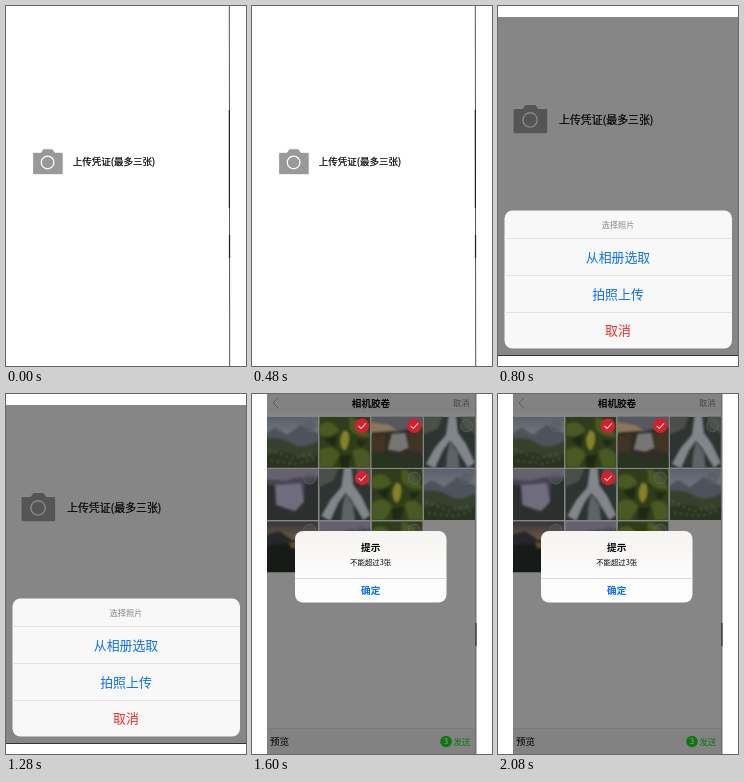
Recreate the animation shown at these times as an HTML page. Size 240 by 360 pixels, loop 2.4 s.

```html
<!DOCTYPE html>
<html lang="zh-CN">
<head>
<meta charset="utf-8">
<style>
  html, body { margin: 0; width: 100%; height: 100%; overflow: hidden; background: #fff; }
  svg { display: block; width: 240px; height: 360px; }
  text { font-family: "Noto Sans CJK SC", "Noto Sans CJK", sans-serif; }
  .mid { text-anchor: middle; }
  .bold { font-weight: 700; }
  .label { stroke: #000; stroke-width: .2; }
  .soft { filter: blur(.8px); }
</style>
</head>
<body>
<svg viewBox="0 0 240 360">
  <defs>
    <g id="camera">
      <path d="M1.5 3.5H8L10 .5Q10.4 0 11 0H19Q19.6 0 20 .5L22 3.5H28.5Q30 3.5 30 5V24Q30 25.5 28.5 25.5H1.5Q0 25.5 0 24V5Q0 3.5 1.5 3.5Z"/>
      <circle cx="14.7" cy="13.5" r="6.2" fill="none" stroke-width="1.2"/>
    </g>
    <linearGradient id="sky" x2="0" y2="1">
      <stop stop-color="#59616d"/><stop offset=".55" stop-color="#808184"/>
    </linearGradient>
    <linearGradient id="dusk" x2="0" y2="1">
      <stop stop-color="#33343f"/><stop offset=".4" stop-color="#765d3c"/>
    </linearGradient>
    <linearGradient id="glass" x2="0" y2="1">
      <stop stop-color="#f6f4f2"/><stop offset=".6" stop-color="#fcfcfc"/>
    </linearGradient>
    <symbol id="meadow" viewBox="0 0 51 51">
      <path fill="url(#sky)" d="M0 0H51V51H0Z"/>
      <g class="soft">
        <path fill="#4c535a" d="M-3 18L8 11L20 18L34 8L54 18V34H-3Z"/>
        <path fill="#35412c" d="M-3 22Q14 20 25 27T54 23V54H-3Z"/>
        <path fill="#29331f" d="M-3 40Q16 32 28 39T54 36V54H-3Z"/>
        <path fill="none" stroke="#606b4c" stroke-width="2" stroke-linecap="round" stroke-dasharray="0 6" d="M3 33L24 42L48 36M5 44L30 47L47 42"/>
      </g>
    </symbol>
    <symbol id="fruit" viewBox="0 0 51 51">
      <path fill="#303d1a" d="M0 0H51V51H0Z"/>
      <g class="soft">
        <path fill="#485922" d="M0 8Q13 0 20 14Q10 23 0 18ZM30 0Q45 3 51 20Q38 22 30 12ZM0 34Q12 25 21 38L13 51H0ZM33 34Q45 27 51 39V51H37Z"/>
        <path fill="#1e2914" d="M5 23L18 18L16 31ZM37 23L49 24L41 31ZM20 39L32 38L29 51H21Z"/>
        <path fill="#85812a" d="M24 14Q30 12 30 23Q29 31 25 34Q20 30 21 21Z"/>
      </g>
    </symbol>
    <symbol id="falls" viewBox="0 0 51 51">
      <path fill="#302d27" d="M0 0H51V51H0Z"/>
      <g class="soft">
        <path fill="#55585e" d="M-3 -3H54V9L38 12L25 15L-3 9Z"/>
        <path fill="#8b7659" d="M-3 5L17 8L26 14L-3 16Z"/>
        <path fill="#777474" d="M20 17L34 16L37 31L28 35L16 33Z"/>
        <path fill="#403424" d="M-3 20L14 17L13 35L-3 41ZM36 16L54 11V37L38 34Z"/>
        <path fill="#263420" d="M-3 36Q14 33 24 40T54 37V54H-3Z"/>
      </g>
    </symbol>
    <symbol id="stream" viewBox="0 0 51 51">
      <path fill="#2d3532" d="M0 0H51V51H0Z"/>
      <g class="soft">
        <path fill="#4a5047" d="M-3 -3H20L14 12L-3 19ZM36 -3H54V18L40 11Z"/>
        <path fill="#82858a" d="M25 -3H32L34 16L42 27L51 46L44 51L32 31L26 24L19 34L11 52L2 47L11 31L22 18Z"/>
        <path fill="#5c6468" d="M26 25L34 36L36 54H22L23 38Z"/>
      </g>
    </symbol>
    <symbol id="gorge" viewBox="0 0 51 51">
      <path fill="#65616f" d="M0 0H51V51H0Z"/>
      <g class="soft">
        <path fill="#454452" d="M-3 10L18 12L28 9L54 7V54H-3Z"/>
        <path fill="#706b7d" d="M8 16L34 14L37 33L28 42L9 36Z"/>
        <path fill="#2b302f" d="M-3 15L8 17L9 36L28 43L37 33L38 14L54 10V54H-3Z"/>
      </g>
    </symbol>
    <symbol id="sunset" viewBox="0 0 51 51">
      <path fill="url(#dusk)" d="M0 0H51V51H0Z"/>
      <g class="soft">
        <path fill="#25272b" d="M-3 14L12 10L26 19L54 11V31H-3Z"/>
        <path fill="#171b18" d="M-3 25Q26 19 54 28V54H-3Z"/>
        <path fill="#674b25" d="M22 21H34L44 26L24 27Z"/>
      </g>
    </symbol>
    <g id="picked">
      <circle r="7.2" fill="#d3202f"/>
      <path d="M-3.5 0L-1 2.7L3.8 -2.5" fill="none" stroke="#ddd" stroke-width="1.1"/>
    </g>
    <circle id="unpicked" r="6" fill="#555" fill-opacity=".4" stroke="#626970" stroke-width=".7"/>
  </defs>

  <g class="scene">
    <path fill="#fff" d="M0 0H240V360H0Z"/>
    <use href="#camera" transform="translate(26.6 142.7) scale(1.02)" fill="#999" stroke="#fff"/>
    <text class="label" x="66.8" y="159.2" font-size="9.5">上传凭证(最多三张)</text>
    <path stroke="#555" d="M223.3 0L223.7 360"/>
    <path stroke="#222" stroke-width="1.2" d="M223.4 104V202M223.5 229V252"/>
  </g>

  <g class="scene">
    <path fill="#fff" d="M0 0H240V360H0Z"/>
    <path fill="#868686" d="M0 11H240V350H0Z"/>
    <path stroke="#333" d="M0 349.5H240"/>
    <use href="#camera" transform="translate(15 98.3) scale(1.16)" fill="#555" stroke="#888"/>
    <text class="label" x="61" y="117.5" font-size="10.9">上传凭证(最多三张)</text>
    <rect x="6.5" y="204.5" width="227.5" height="138" rx="8" fill="#f8f8f8"/>
    <path stroke="#e2e2e2" d="M6.5 232.5H234M6.5 269.5H234M6.5 306.5H234"/>
    <g class="mid">
      <text x="120" y="221.7" font-size="8.2" fill="#888">选择照片</text>
      <g font-size="12.9">
        <text x="120" y="255.8" fill="#0d70f5">从相册选取</text>
        <text x="120" y="292.5" fill="#0d70f5">拍照上传</text>
        <text x="120" y="328.7" fill="#ee2a24">取消</text>
      </g>
    </g>
  </g>

  <g class="scene">
    <path fill="#fff" d="M0 0H240V360H0Z"/>
    <path fill="#868686" d="M15 0H224V360H15Z"/>
    <path fill="#828282" d="M15 0H224V18.5H15Z"/>
    <path fill="none" stroke="#5c5c5c" d="M26 4L21 9L26 14"/>
    <text class="mid bold" x="119" y="12.8" font-size="9.6">相机胶卷</text>
    <text x="201" y="12" font-size="8.2" fill="#444">取消</text>
    <g id="photos"></g>
    <path fill="#828282" d="M15 334.5H224V360H15Z"/>
    <path stroke="#767676" stroke-width=".6" d="M15 334.5H224"/>
    <text x="18" y="350.7" font-size="9.6">预览</text>
    <circle cx="194" cy="347.5" r="5.8" fill="#0e780f"/>
    <text class="mid" x="194" y="350.4" font-size="8" fill="#999">3</text>
    <text x="201.5" y="350.5" font-size="8.4" fill="#0e780f">发送</text>
    <path stroke="#555" stroke-width=".8" d="M224 0V360"/>
    <path stroke="#222" d="M224 229V252"/>
    <rect x="43" y="137" width="151.5" height="71.5" rx="8" fill="url(#glass)"/>
    <path stroke="#dadada" d="M43 184.5H194.5"/>
    <g class="mid">
      <text class="bold" x="118.7" y="157.4" font-size="9.6">提示</text>
      <text x="118.7" y="171" font-size="7.4">不能超过3张</text>
      <text class="bold" x="118.7" y="200" font-size="9.6" fill="#0d70f5">确定</text>
    </g>
  </g>
</svg>
<script>
  const album = "meadow fruit falls stream gorge stream fruit meadow sunset gorge fruit".split(" ");
  const picked = [1, 2, 5];

  document.getElementById("photos").innerHTML = album.map((photo, i) => {
    const x = 15 + i % 4 * 52.3;
    const y = 22.8 + Math.floor(i / 4) * 52.2;
    const mark = picked.includes(i) ? "picked" : "unpicked";
    return `<use href="#${photo}" x="${x}" y="${y}" width="51" height="51"/>
      <use href="#${mark}" x="${x + 42.7}" y="${y + 9}"/>`;
  }).join("");

  const scenes = [...document.querySelectorAll(".scene")];

  function draw() {
    const current = Math.floor(performance.now() % 2400 / 800);
    scenes.forEach((scene, i) => scene.style.display = i === current ? "" : "none");
    requestAnimationFrame(draw);
  }
  draw();
</script>
</body>
</html>
```
